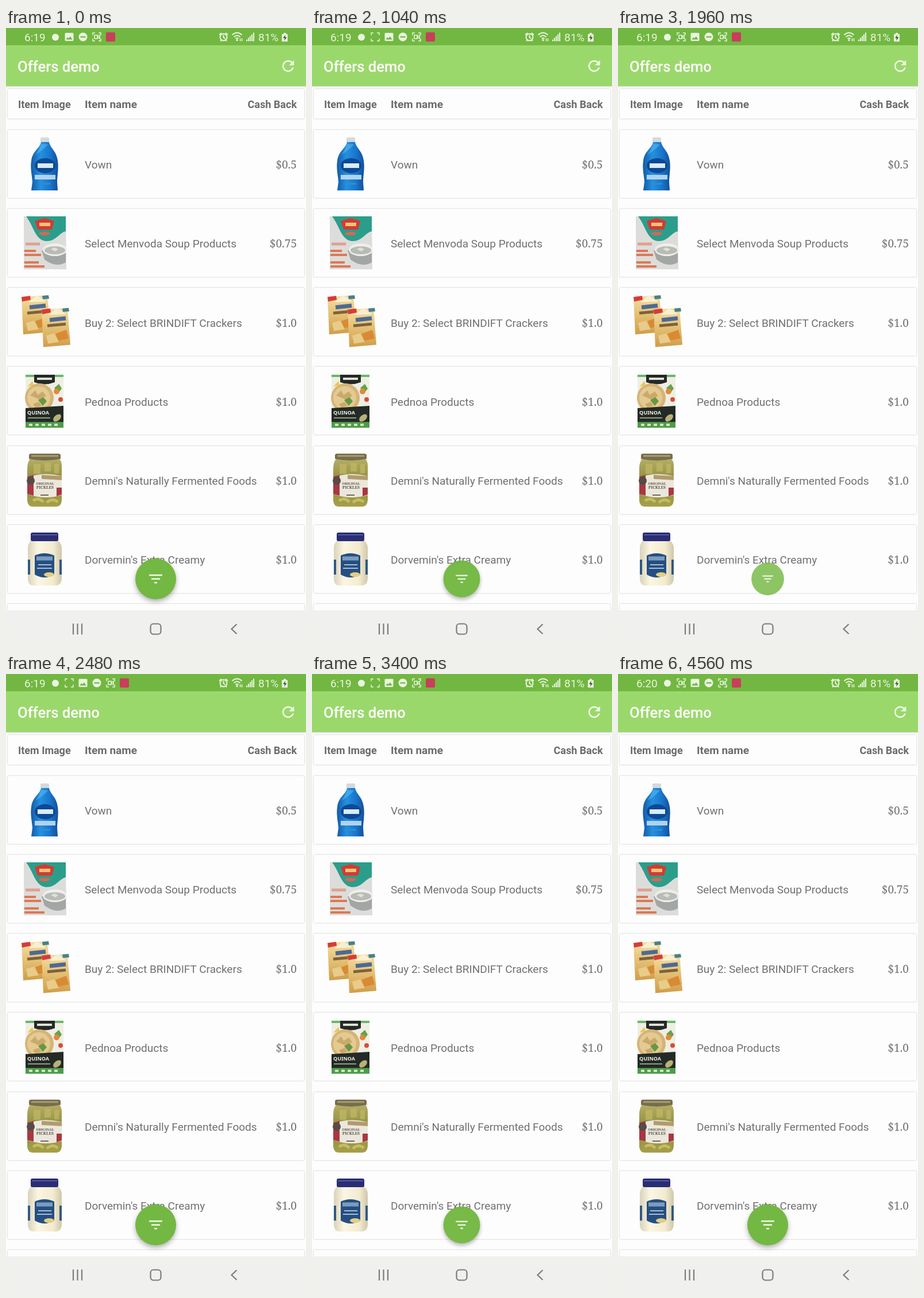
An HTML page for the animation above (5.08 s loop, 522 by 1073 pixels).

```html
<!DOCTYPE html>
<html lang="en">
<head>
<meta charset="utf-8">
<title>Offers demo</title>
<style>
  html, body { margin: 0; width: 100%; height: 100%; overflow: hidden; background: #fdfdfd; }
  svg { display: block; width: 522px; height: 1073px; }
  text { font-family: Roboto, "Noto Sans", sans-serif; font-size: 19px; fill: #707070; }
  .bold { font-weight: 700; fill: #696c68; }
  .small { font-size: 18px; }
  .price { font-family: "Noto Serif", serif; }
  .end { text-anchor: end; }
  .card { fill: #fdfdfd; filter: drop-shadow(0 .6px 1px rgba(0, 0, 0, .28)); }
  .bar { filter: drop-shadow(0 1px 1px rgba(0, 0, 0, .14)); }
  .status text { fill: #eaf5e1; }
  .line { fill: none; stroke: #eaf5e1; stroke-width: 1.5; }
  .nav { fill: none; stroke: #7c7c7c; stroke-width: 2.2; }
  .raised { filter: drop-shadow(0 4px 4px rgba(0, 0, 0, .3)); }
</style>
</head>
<body>
<svg viewBox="0 0 522 1073">
  <defs>
    <linearGradient id="soap" x2="1" y2="0">
      <stop stop-color="#1459a6"/><stop offset=".35" stop-color="#2491df"/>
      <stop offset=".7" stop-color="#1976cb"/><stop offset="1" stop-color="#124f9b"/>
    </linearGradient>
    <linearGradient id="brine" x2="0" y2="1">
      <stop stop-color="#b5ad65"/><stop offset=".5" stop-color="#8b8b3b"/><stop offset="1" stop-color="#a6a04b"/>
    </linearGradient>
    <linearGradient id="cream" x2="1" y2="0">
      <stop stop-color="#d9d2b9"/><stop offset=".3" stop-color="#fbf6e3"/>
      <stop offset=".75" stop-color="#f3ebd0"/><stop offset="1" stop-color="#cfc7aa"/>
    </linearGradient>
    <linearGradient id="wheat" x2="0" y2="1">
      <stop stop-color="#f3dfa4"/><stop offset=".45" stop-color="#e6c378"/><stop offset="1" stop-color="#cf9d49"/>
    </linearGradient>
    <g id="box">
      <path d="M0 3 45 0 50 64 3 68Z" fill="url(#wheat)"/>
      <path d="M12 12 27 0 43 11Z" fill="#f8efd0"/>
      <path d="M0 3 15 1 16 8 1 11Z" fill="#d63b3a"/>
      <path d="M36 1 47 0 48 6 37 7Z" fill="#45808d"/>
      <path d="M14 21 42 18" stroke="#4c6a96" stroke-width="7"/>
      <path d="M10 31 42 28" stroke="#80613c" stroke-width="5"/>
      <path d="M24 45 43 38 47 53 29 57Z" fill="#d98a35"/>
      <path d="M8 48 22 44 30 59 11 62Z" fill="#e9cb8a"/>
    </g>
    <g id="frame"><path class="line" d="M-7 -3V-7H-3M3 -7H7V-3M7 3V7H3M-3 7H-7V3"/></g>
    <g id="camera"><path class="line" d="M-4 -3H1V3H-4ZM1 0 5 -3V3Z"/></g>
  </defs>

  <rect width="522" height="1073" fill="#fdfdfd"/>
  <g id="list">
    <rect class="card" x="3" y="106" width="516" height="51.5" rx="2"/>
    <text class="bold small" x="21" y="139">Item Image</text>
    <text class="bold" x="137" y="139">Item name</text>
    <text class="bold small end" x="506" y="139">Cash Back</text>
    <g id="rows"></g>

    <g id="soapBottle">
      <rect x="60" y="190" width="15" height="9" rx="2" fill="#d4d9dd"/>
      <path d="M61 198H75C77 209 88 213 90 231C92 243 89 257 89 267L90 282H44L46 267C45 255 42 243 44 231C46 213 59 209 61 198Z" fill="url(#soap)"/>
      <path d="M61 201Q58 212 51 220Q65 212 73 202Z" fill="#53b4ef" opacity=".65"/>
      <ellipse cx="68" cy="239" rx="18" ry="13" fill="#0c4996"/>
      <path d="M55 239H82" stroke="#d9ecfa" stroke-width="8"/>
      <path d="M50 255H86V263H50Z" fill="#afd3ed"/>
      <path d="M57 269H77V272H57Z" fill="#338bcc"/>
    </g>

    <g id="soupBag">
      <path d="M31 327H104L105 419H31Z" fill="#dcdddb"/>
      <path d="M35 327H104V353C93 355 87 371 69 370C51 368 48 344 35 327Z" fill="#2b9e8b"/>
      <path d="M50 335 67 330 84 335 80 350H55Z" fill="#d33b35"/>
      <path d="M58 341H77" stroke="#f1c476" stroke-width="6"/>
      <ellipse cx="67" cy="357" rx="10" ry="3" fill="#db6651"/>
      <path d="M62 386H104V407Q87 417 67 402Z" fill="#a2a6a4"/>
      <ellipse cx="85" cy="385" rx="21" ry="11" fill="#eeeeeb"/>
      <ellipse cx="85" cy="386" rx="18" ry="7" fill="#b8bbb6"/>
      <path d="M78 384 84 381 91 384 86 388Z" fill="#e0dfd7"/>
      <path d="M34 375H59" stroke="#dfa18e" stroke-width="5"/>
      <path d="M32 387H52M32 394H61M32 407H57M32 414H67" stroke="#df7753" stroke-width="4"/>
    </g>

    <use href="#box" x="27" y="464"/>
    <use href="#box" x="62" y="486"/>

    <g id="grainBox">
      <path d="M34 602H100V694H34Z" fill="#efeee4"/>
      <path d="M49 602H85V615Q67 622 49 615Z" fill="#242925"/>
      <path d="M54 609H80" stroke="#dedfd7" stroke-width="4"/>
      <path d="M34 602H49V606H34ZM85 602H100V606H85Z" fill="#69b76b"/>
      <circle cx="58" cy="642" r="25" fill="#d5b477"/>
      <circle cx="57" cy="642" r="20" fill="#e4ca91"/>
      <path d="M42 638 51 629 55 637 64 631 70 639 58 645ZM47 653 57 649 62 656 51 659Z" fill="#c9aa6c"/>
      <path d="M56 646 65 641 71 648 64 656Z" fill="#669844"/>
      <path d="M84 625 92 618 97 626 91 634Z" fill="#62a34c"/>
      <circle cx="88" cy="631" r="5" fill="#e48839"/>
      <circle cx="95" cy="645" r="4" fill="#d94c35"/>
      <path d="M37 623 46 613 48 620Z" fill="#edc847"/>
      <path d="M34 660 100 656V685H34Z" fill="#242a25"/>
      <text x="37" y="671" style="font: 700 9px 'Noto Sans', sans-serif; fill: #f2f2e7">QUINOA</text>
      <path d="M38 677H77" stroke="#929d83" stroke-width="2"/>
      <path d="M34 684H100V694H34Z" fill="#4c9c4b"/>
      <ellipse cx="89" cy="677" rx="8" ry="5" transform="rotate(-40 89 677)" fill="#b8b178"/>
      <path d="M40 689H90" stroke="#d4e4b7" stroke-width="4" stroke-dasharray="6 5"/>
    </g>

    <g id="pickleJar">
      <path d="M42 748H93Q98 754 97 765V820Q96 831 88 831H47Q38 831 37 821V765Q37 754 42 748Z" fill="url(#brine)"/>
      <path d="M40 742Q40 739 44 739H91Q95 739 95 742V748Q67 754 40 748Z" fill="#766d4c"/>
      <path d="M44 743H91" stroke="#a79c71" stroke-width="3"/>
      <path d="M48 757H60V774H48ZM67 755H78V770H67ZM84 757H92V773H84Z" fill="#c2b865" opacity=".7"/>
      <path d="M37 780Q67 770 97 778V811Q66 820 37 809Z" fill="#ece7dc"/>
      <path d="M37 779 48 776V812L37 809ZM88 798H97V810L88 813Z" fill="#a83742"/>
      <circle cx="43" cy="786" r="7" fill="#554b47"/>
      <path d="M62 776 97 778V785L62 783Z" fill="#b19b6e"/>
      <text x="68" y="793" text-anchor="middle" style="font: 700 6px 'Noto Serif', serif; fill: #59564d">ORIGINAL</text>
      <text x="68" y="800" text-anchor="middle" style="font: 700 7px 'Noto Serif', serif; fill: #59564d">PICKLES</text>
      <path d="M60 811H74" stroke="#6f6b5d" stroke-width="2"/>
      <path d="M47 821Q56 814 65 823M71 824Q81 815 90 823" stroke="#c7bb62" stroke-width="5" fill="none"/>
    </g>

    <g id="spreadJar">
      <path d="M43 890H91Q98 896 97 908V954Q97 968 86 968H48Q38 968 38 955V908Q37 896 43 890Z" fill="url(#cream)"/>
      <rect x="43" y="876" width="48" height="15" rx="3" fill="#292d74"/>
      <path d="M45 880H89" stroke="#52599d" stroke-width="2"/>
      <path d="M50 916Q67 908 84 916V949Q67 959 50 949Z" fill="#254f82"/>
      <path d="M53 921H81" stroke="#7b9cbd" stroke-width="7"/>
      <path d="M56 932H79M54 938H80" stroke="#a9bfd2" stroke-width="2"/>
      <ellipse cx="75" cy="949" rx="9" ry="4" fill="#e2cf83"/>
      <path d="M38 923H42V949H38ZM93 923H97V949H93Z" fill="#315982"/>
    </g>
  </g>

  <path id="spinner" fill="none" stroke="#6cb33b" stroke-width="5.5" d="M261.8 534A22 22 0 0 1 269.5 535.5"/>

  <g id="fab">
    <circle id="disc" r="35.5" fill="#73b842"/>
    <path d="M-11.4 -6.4H11.4M-7.6 0H7.6M-2.5 6.4H2.5" stroke="#f4faef" stroke-width="2.5"/>
  </g>

  <rect class="bar" y="30" width="522" height="71" fill="#9bd86c"/>
  <rect width="522" height="30" fill="#72b741"/>
  <text x="20" y="76" style="font-size: 25.6px; font-weight: 500; fill: #fff">Offers demo</text>
  <path transform="translate(475.8 50.8) scale(1.27)" fill="#f0fbe8" d="M17.65 6.35C16.2 4.9 14.21 4 12 4c-4.42 0-7.99 3.58-7.99 8s3.57 8 7.99 8c3.73 0 6.84-2.55 7.73-6h-2.08c-.82 2.33-3.04 4-5.65 4-3.31 0-6-2.69-6-6s2.69-6 6-6c1.66 0 3.14.69 4.22 1.78L13 11h7V4l-2.35 2.35z"/>

  <g class="status">
    <text id="clock" x="32" y="23">6:19</text>
    <circle cx="86" cy="16" r="6" fill="#eaf5e1"/>
    <g id="notice" transform="translate(110 15.5)">
      <use href="#frame"/>
      <use href="#camera" id="recording"/>
    </g>
    <g id="tray">
      <path fill="#eaf5e1" fill-rule="evenodd" d="M104 8.5H116Q117.5 8.5 117.5 10V21Q117.5 22.5 116 22.5H104Q102.5 22.5 102.5 21V10Q102.5 8.5 104 8.5ZM104.5 20H115.5L112 14.5 109 18 107 16Z"/>
      <circle cx="134" cy="15.5" r="7.5" fill="#eaf5e1"/>
      <path d="M129.5 15.5H138.5" stroke="#8fc36a" stroke-width="3"/>
      <g transform="translate(158 15.5)"><use href="#frame"/><use href="#camera"/></g>
      <rect x="174" y="7.5" width="16" height="16" rx="2" fill="#c83e5b"/>
    </g>
    <g class="line">
      <circle cx="378.5" cy="16" r="6" stroke-width="2"/>
      <path d="M378.5 12V16.5L381.5 18.5M371 12 375 8.5M382 8.5 386 12M373 23 375 20.5M384 23 382 20.5" stroke-width="2"/>
      <path d="M393.5 12Q402 4.5 410.5 12M396.5 15.5Q402 10.5 407.5 15.5M399.5 18.5Q402 16.5 404.5 18.5" stroke-width="2"/>
      <path d="M407.5 18V23M410.5 18V23"/>
      <path d="M419 20V23M422 17V23M425 14V23M428 11V23M431 8V23" stroke-width="2"/>
    </g>
    <circle cx="402" cy="21" r="1.8" fill="#eaf5e1"/>
    <text x="439" y="23">81%</text>
    <path d="M480 10.5H483V8.5H487V10.5H490V23.5H480Z" fill="#eaf5e1"/>
    <path d="M486 12 482 17.5H485L484 22 488.5 16H485.5Z" fill="#36591f"/>
  </g>

  <rect y="1011" width="522" height="62" fill="#f0f0ef"/>
  <path class="nav" d="M117 1034V1053M124.5 1034V1053M132 1034V1053M401.5 1035 392.5 1043.5 401.5 1052"/>
  <rect class="nav" x="251.5" y="1034.5" width="18" height="18" rx="5"/>
</svg>

<script>
const LOOP = 5080, STEP = 40;
const PITCH = 137.25;
const offers = [
  ["Vown", "$0.5"],
  ["Select Menvoda Soup Products", "$0.75"],
  ["Buy 2: Select BRINDIFT Crackers", "$1.0"],
  ["Pednoa Products", "$1.0"],
  ["Demni's Naturally Fermented Foods", "$1.0"],
  ["Dorvemin's Extra Creamy", "$1.0"],
  ["", ""]
];
// Each refresh: button shrinks, list clears, list returns, button is full size.
const refreshes = [
  [120, 160, 240, 320],
  [1040, 1080, 1160, 1240],
  [1840, 1880, 1960, 2120],
  [3400, 3440, 3520, 3560],
  [4080, 4120, 4200, 4320]
];

const $ = id => document.getElementById(id);
const show = (id, on) => $(id).setAttribute("visibility", on ? "inherit" : "hidden");

$("rows").innerHTML = offers.map(([name, price], i) => {
  const top = Math.floor(177 + i * PITCH);
  const base = Math.round(244 + i * PITCH);
  return `<rect class="card" x="3" y="${top}" width="516" height="118" rx="2"/>
    <text x="137" y="${base}">${name}</text>
    <text class="price end" x="506" y="${base}">${price}</text>`;
}).join("");

function poseAt(t) {
  const cycle = refreshes.find(([start, , , end]) => t >= start && t < end);
  if (!cycle) return { scale: 1, alpha: 1, loading: false };
  const [, clear, back, end] = cycle;
  if (t < clear) return { scale: .9, alpha: .97, loading: false };
  if (t < back) return { scale: .75, alpha: .76, loading: true };
  const p = (t - back + STEP) / (end - back + STEP);
  return { scale: .75 + .25 * p, alpha: .76 + .24 * p, loading: false };
}

function draw(t) {
  const { scale, alpha, loading } = poseAt(t);
  show("list", !loading);
  show("spinner", loading);
  $("fab").setAttribute("transform", `translate(260.5 956.5) scale(${scale})`);
  $("fab").setAttribute("opacity", alpha);
  $("disc").setAttribute("class", scale > .85 ? "raised" : "");

  show("notice", t >= STEP);
  show("recording", (t >= 1720 && t < 2480) || t >= 4560);
  $("tray").setAttribute("transform", `translate(${t >= STEP ? 24 : 0} 0)`);
  $("clock").textContent = t >= 4560 ? "6:20" : "6:19";
}

const began = performance.now();
function tick() {
  const t = (performance.now() - began) % LOOP;
  draw(Math.floor(t / STEP) * STEP);
  requestAnimationFrame(tick);
}
tick();
</script>
</body>
</html>
```
